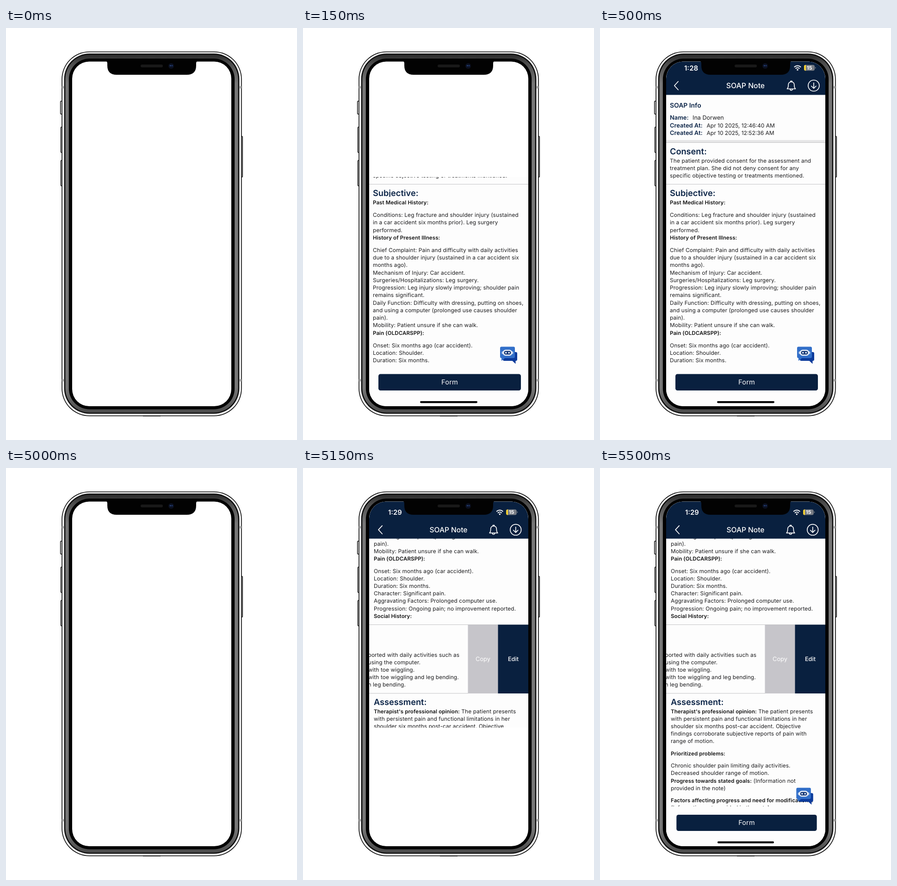
An HTML page that plays this animation: 629x890 px, repeating every 8 s.

```html
<!DOCTYPE html>
<html lang="en">
<head>
<meta charset="utf-8">
<title>SOAP Note</title>
<style>
  html, body { margin: 0; width: 100%; height: 100%; overflow: hidden; background: #fff; }
  svg { display: block; width: 100%; height: 100%; }
  text { font-family: Inter, "Open Sans", sans-serif; white-space: pre; text-rendering: geometricPrecision; fill: #1b1b1d; }
  .body { font-size: 11.85px; letter-spacing: .13px; }
  .body .b { font-weight: 600; font-size: 11.5px; letter-spacing: .1px; fill: #111; }
  .head { font-size: 18.2px; font-weight: 600; fill: #0b2447; }
  .info { font-size: 12.9px; font-weight: 600; fill: #0b2447; }
  .value { font-size: 12px; }
  .light { fill: #fff; }
  .mid { text-anchor: middle; }
  .line { fill: none; stroke: #fff; stroke-width: 1.7; stroke-linecap: round; stroke-linejoin: round; }
</style>
</head>
<body>
<svg viewBox="0 0 629 890">
  <defs>
    <linearGradient id="band" x1="0" y1="0" x2="0" y2="1">
      <stop offset="0" stop-color="#2c2c2c"/>
      <stop offset=".025" stop-color="#4c4c4c"/>
      <stop offset=".08" stop-color="#777"/>
      <stop offset=".93" stop-color="#777"/>
      <stop offset="1" stop-color="#4a4a4a"/>
    </linearGradient>
    <clipPath id="glass"><rect x="143" y="72.5" width="344" height="744.5" rx="37"/></clipPath>
    <clipPath id="wipeA"><rect x="140" width="350"/></clipPath>
    <clipPath id="wipeB"><rect x="140" width="350"/></clipPath>

    <g id="header">
      <text class="light" x="182" y="91.5" font-size="15" font-weight="600">1:<tspan class="light minute"></tspan></text>
    </g>
    <g id="bar">
      <g class="line" stroke-width="2">
        <path d="M420.5 84a9.5 9.5 0 0 1 13 0M423.3 87.2a5.5 5.5 0 0 1 7.4 0" style="stroke-width:2.1"/>
        <path d="M169 115.5l-8.2 9 8.2 9"/>
        <path d="M404.5 131.5c2.3-2 2.6-4 2.6-8.500c0-4 2.500-6.700 6.400-6.700s6.400 2.700 6.400 6.700c0 4.500.3 6.500 2.600 8.500z"/>
        <path d="M412 116v-1.500h3v1.500M411 132.200a2.500 2.500 0 0 0 5 0"/>
        <circle cx="462" cy="124.500" r="12"/>
        <path d="M462 118.500v11.500M457 125.500l5 5 5-5"/>
      </g>
      <circle class="light" cx="427" cy="90.300" r="1.700" fill="#fff"/>
      <rect x="441" y="79.800" width="23" height="12.400" rx="3.600" fill="#777c84"/>
      <path d="M445 79.800h-.4a3.600 3.600 0 0 0-3.600 3.600v5.200a3.600 3.600 0 0 0 3.600 3.600h.4z" fill="#f5d130"/>
      <path d="M465 84v4q1.600-.6 1.600-2t-1.600-2z" fill="#777c84"/>
      <text class="light mid" x="452.800" y="90" font-size="10.800" font-weight="700">15</text>
      <text class="light mid" x="314.500" y="130.300" font-size="15.800" font-weight="500">SOAP Note</text>
    </g>
    <g id="foot">
      <rect x="163" y="747.500" width="308" height="35.500" rx="4.500" fill="#09203f"/>
      <text class="light mid" x="317" y="770.300" font-size="14.600" letter-spacing=".15">Form</text>
      <rect x="253" y="806" width="124" height="4.200" rx="2.100" fill="#050505"/>
      <path d="M436 700h24q3 0 3 3v13q0 3-3 3h-.5v6.500l-7-6.500h-17.500q-3 0-3-3v-2z" fill="#0c3b9b"/>
      <path d="M429 688.500h26q3 0 3 3v18.500q0 3-3 3h-18.500l-7.500 6v-6q-3 0-3-3v-18.500q0-3 3-3z" fill="#326fc9"/>
      <rect x="429.500" y="698.500" width="25" height="6" rx="2" fill="#b9cdec"/>
      <rect x="432" y="695" width="20" height="13" rx="6" fill="#eef2f8"/>
      <rect x="434.500" y="697.500" width="15" height="8" rx="4" fill="#173a78"/>
      <circle cx="438.700" cy="701.500" r="1.700" fill="#fff"/>
      <circle cx="445.300" cy="701.500" r="1.700" fill="#fff"/>
    </g>
  </defs>

  <rect width="629" height="890" fill="#fff"/>
  <g id="phone"></g>

  <g clip-path="url(#glass)">
    <g clip-path="url(#wipeA)">
      <g id="first">
        <rect x="140" y="60" width="350" height="765" fill="#fdfdfd"/>
        <text class="info" x="151" y="171.500" style="font-size:13.900px">SOAP Info</text>
        <text class="info" x="151" y="198.300">Name:</text><text class="value" x="200" y="198.300" style="font-size:12.600px">Ina Dorwen</text>
        <text class="info" x="151" y="214.500">Created At:</text><text class="value" x="230.500" y="214.500">Apr 10 2025, 12:46:40 AM</text>
        <text class="info" x="151" y="230.500">Created At:</text><text class="value" x="230.500" y="230.500">Apr 10 2025, 12:52:36 AM</text>
        <rect x="140" y="242" width="350" height="5.500" fill="#e6e6e7"/>
        <rect x="140" y="247" width="350" height="1" fill="#c4c4c6"/>
        <text class="head" x="151" y="273">Consent:</text>
        <rect x="140" y="337" width="350" height="1" fill="#c4c4c6"/>
        <text class="head" x="151" y="363">Subjective:</text>
        <rect x="145" y="364.600" width="200" height="5" fill="#fdfdfd"/>
      </g>
      <rect x="140" y="60" width="350" height="84.500" fill="#09203f"/>
      <use href="#bar"/>
      <text class="light" x="182" y="91.500" font-size="15" font-weight="600">1:28</text>
      <use href="#foot"/>
    </g>
    <g clip-path="url(#wipeB)">
      <g id="second">
        <rect x="140" y="60" width="350" height="765" fill="#fdfdfd"/>
        <rect x="140" y="338" width="350" height="1" fill="#c4c4c6"/>
        <rect x="140" y="486.300" width="217" height="1" fill="#c4c4c6"/>
        <rect x="356.500" y="338.500" width="65.500" height="148.500" fill="#c6c5ca"/>
        <rect x="421.500" y="338.500" width="68" height="148.500" fill="#09203f"/>
        <text class="light mid" x="389" y="417.300" font-size="12.800">Copy</text>
        <text class="light mid" x="454.500" y="417.300" font-size="12.800" font-weight="500">Edit</text>
        <text class="head" x="153" y="511.700">Assessment:</text>
      </g>
      <rect x="140" y="60" width="350" height="92.600" fill="#09203f"/>
      <rect x="140" y="731" width="350" height="100" fill="#fdfdfd"/>
      <g transform="translate(4.700 10.800) scale(.985)">
        <use href="#bar"/>
        <text class="light" x="182" y="91.500" font-size="15" font-weight="600">1:29</text>
      </g>
      <use href="#foot" transform="translate(4.700 12.700) scale(.985)"/>
    </g>
  </g>

  <path d="M216 71.500q3 1 3 5v4.500q0 20 20 20h152q20 0 20-20v-4.500q0-4 3-5z" fill="#020202"/>
  <rect x="291" y="79" width="48" height="6" rx="3" fill="#191919"/>
  <circle cx="357" cy="82" r="6" fill="#0b1020"/>
  <circle cx="355.300" cy="81.500" r="1.400" fill="#28467f"/>
  <circle cx="359" cy="81.500" r="1.400" fill="#223b70"/>
</svg>

<script>
const NS = 'http://www.w3.org/2000/svg';
const $ = id => document.getElementById(id);

function add(parent, tag, attrs, content = '') {
  const el = document.createElementNS(NS, tag);
  for (const k in attrs) el.setAttribute(k, attrs[k]);
  el.textContent = content;
  return parent.appendChild(el);
}

// Phone: side keys, then nested rounded shells from the rim to the glass.
function drawPhone() {
  const g = $('phone');
  const box = (x, y, width, height, rx, fill, more) =>
    add(g, 'rect', { x, y, width, height, rx, fill, ...more });
  const key = { stroke: '#0a0a0a', 'stroke-width': 1.5 };
  box(117.7, 158, 8, 28, 1.5, '#eee', key);
  box(118.5, 214, 8, 55, 1.5, '#eee', key);
  box(118.5, 286, 8, 55, 1.5, '#eee', key);
  box(503, 234, 8.3, 88, 1.5, '#eee', key);
  const shells = [
    [120.2, 50.7, 838.5, 60, '#080808'],
    [121.8, 52.2, 837, 58.5, '#f4f4f4'],
    [125.7, 55.2, 833.3, 55, '#0a0a0a'],
    [128.3, 57.6, 831, 52.5, 'url(#band)'],
    [135.8, 66, 823.7, 45, '#020202'],
    [143, 72.5, 817, 37, '#fff']
  ];
  for (const [x, top, bottom, r, fill] of shells) {
    box(x, top, 630 - 2 * x, bottom - top, r, fill);
  }
  for (const y of [125.5, 758.5]) {
    box(121, y, 4.5, 5, 0, '#a6a6a6');
    box(504.5, y, 4.5, 5, 0, '#a6a6a6');
  }
  box(296, 837.8, 38, 1.2, 0, '#222');
}

// Text between asterisks is bold; an empty entry is a paragraph gap.
function write(parent, x, y, lines, pitch = 16.25, gap = 10.8) {
  for (const line of lines) {
    if (!line) { y += gap; continue; }
    const text = add(parent, 'text', { class: 'body', x, y });
    line.split('*').forEach((part, i) => {
      if (part) add(text, 'tspan', i % 2 ? { class: 'b' } : {}, part);
    });
    y += pitch;
  }
}

drawPhone();

write($('first'), 151, 290.5, [
  'The patient provided consent for the assessment and',
  'treatment plan. She did not deny consent for any',
  'specific objective testing or treatments mentioned.'
]);
write($('first'), 151, 381, [
  '*Past Medical History:*', '',
  'Conditions: Leg fracture and shoulder injury (sustained',
  'in a car accident six months prior). Leg surgery',
  'performed.',
  '*History of Present Illness:*', '',
  'Chief Complaint: Pain and difficulty with daily activities',
  'due to a shoulder injury (sustained in a car accident six',
  'months ago).',
  'Mechanism of Injury: Car accident.',
  'Surgeries/Hospitalizations: Leg surgery.',
  'Progression: Leg injury slowly improving; shoulder pain',
  'remains significant.',
  'Daily Function: Difficulty with dressing, putting on shoes,',
  'and using a computer (prolonged use causes shoulder',
  'pain).',
  'Mobility: Patient unsure if she can walk.',
  '*Pain (OLDCARSPP):*', '',
  'Onset: Six months ago (car accident).',
  'Location: Shoulder.',
  'Duration: Six months.'
]);

const second = $('second');
write(second, 153, 152, [
  'and using a computer (prolonged use causes shoulder',
  'pain).',
  'Mobility: Patient unsure if she can walk.',
  '*Pain (OLDCARSPP):*', '',
  'Onset: Six months ago (car accident).',
  'Location: Shoulder.',
  'Duration: Six months.',
  'Character: Significant pain.',
  'Aggravating Factors: Prolonged computer use.',
  'Progression: Ongoing pain; no improvement reported.',
  '*Social History:*'
], 16.1, 10.6);
write(second, 140.5, 408, [
  'ported with daily activities such as',
  'using the computer.',
  'with toe wiggling.',
  'with toe wiggling and leg bending.',
  'h leg bending.'
], 16.1);
write(second, 153, 529.5, [
  "*Therapist's professional opinion:* The patient presents",
  'with persistent pain and functional limitations in her',
  'shoulder six months post-car accident. Objective',
  'findings corroborate subjective reports of pain with',
  'range of motion.', '',
  '*Prioritized problems:*', '',
  'Chronic shoulder pain limiting daily activities.',
  'Decreased shoulder range of motion.',
  '*Progress towards stated goals:* (Information not',
  'provided in the note)', '',
  '*Factors affecting progress and need for modifications:*',
  '(Information not provided in the note)'
], 16.1, 10.6);

const LOOP = 8000, SWAP = 5000, WIPE = 500, STEP = 50, HEIGHT = 755;
const wipeA = $('wipeA').firstElementChild;
const wipeB = $('wipeB').firstElementChild;

// Eased wipe in 50 ms steps: the first screen rises, the second falls.
function shown(ms) {
  const t = Math.min(1, Math.max(0, Math.floor(ms / STEP) * STEP / WIPE));
  return HEIGHT * (1 - (1 - t) ** 3);
}

function reveal(rect, y, height) {
  rect.setAttribute('y', y);
  rect.setAttribute('height', height);
}

const start = performance.now();
function frame() {
  const ms = (performance.now() - start) % LOOP;
  const a = ms < SWAP ? shown(ms) : 0;
  const b = shown(ms - SWAP);
  reveal(wipeA, 818 - a, a);
  reveal(wipeB, 65, b);
  requestAnimationFrame(frame);
}
frame();
</script>
</body>
</html>
```
